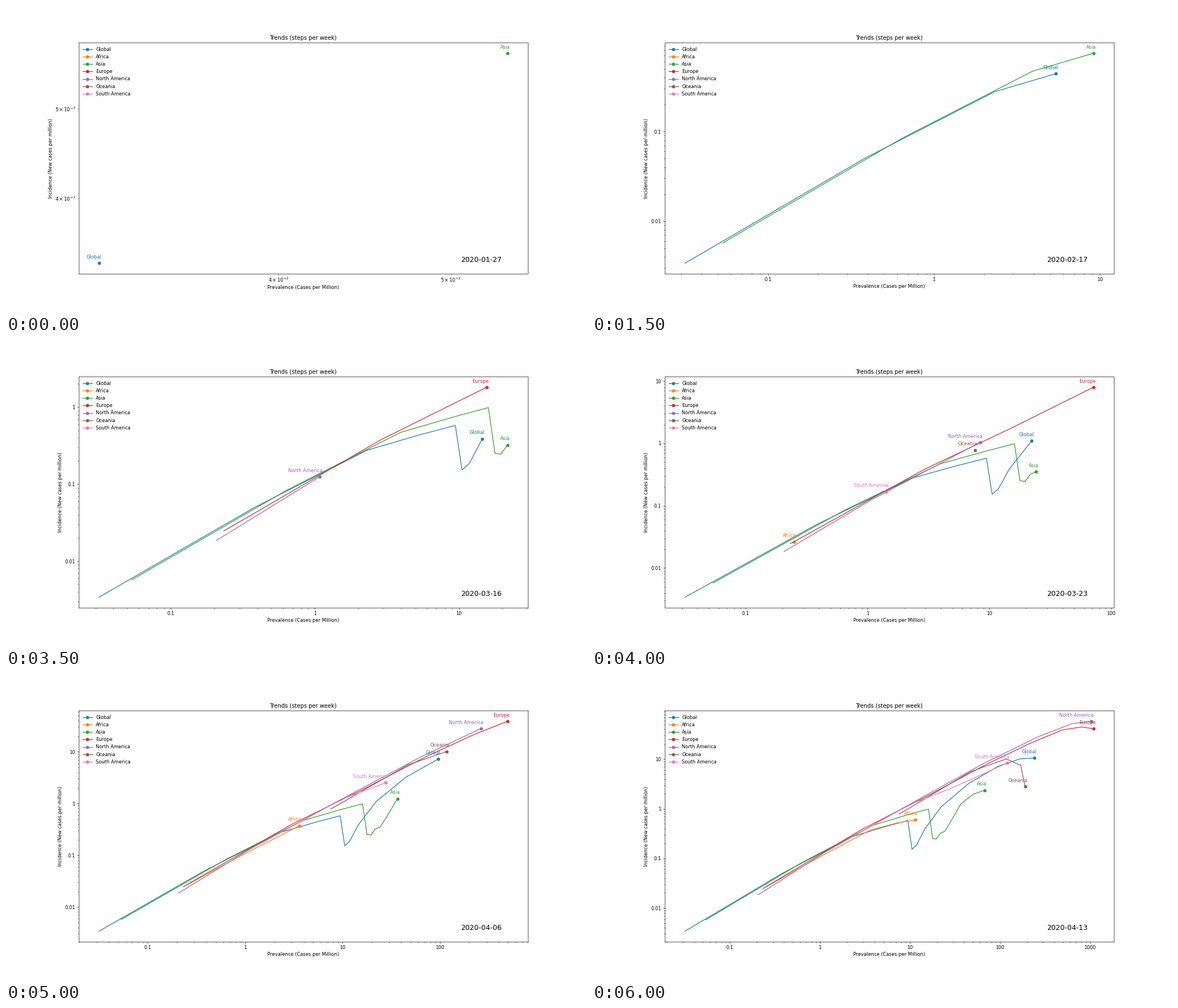
Animation of 1028x544 px, one loop 10 s. Source, as a matplotlib script:

```python
import numpy as np
import matplotlib.pyplot as plt
from matplotlib.animation import FuncAnimation
from matplotlib.ticker import FuncFormatter

DPI = 60
LAST_WEEK = 12
FRAMES = 20          # the final week is held until the loop restarts
FIRST_DAY = np.datetime64("2020-01-27")

# region: (first week, prevalence in that week, daily new cases for each week)
REGIONS = {
    "Global": (0, 0.0317, [0.0034, 0.0498, 0.2775, 0.44, 0.58, 0.153, 0.186,
                           0.388, 1.103, 3.27, 7.2, 10.15, 10.55]),
    "Africa": (8, 0.25, [0.0265, 0.109, 0.372, 0.522, 0.598]),
    "Asia": (0, 0.0538, [0.00575, 0.0835, 0.47, 0.745, 0.988, 0.2527, 0.2452,
                         0.3237, 0.35, 0.528, 1.245, 1.98, 2.36]),
    "Europe": (5, 0.2335, [0.0247, 0.38, 1.818, 8.0, 21.3, 39.0, 44.6, 41.0]),
    "North America": (6, 0.2067, [0.0185, 0.1255, 1.04, 8.24, 28.2, 52.0, 58.3]),
    "Oceania": (8, 7.614, [0.786, 5.58, 10.13, 7.5, 2.78]),
    "South America": (8, 1.42, [0.168, 1.226, 2.52, 4.79, 8.44]),
}


class Track:
    """Trail, head marker and label of one region."""

    def __init__(self, ax, name, color, first, start, rates):
        self.first = first
        self.y = np.array(rates)
        self.x = start + 7 * np.concatenate([[0], np.cumsum(self.y[1:])])
        self.trail, = ax.plot([], [], "-", color=color)
        self.head, = ax.plot([], [], "-o", color=color, label=name)
        self.label = ax.annotate(name, (1, 1), xytext=(5, 10), color=color,
                                 textcoords="offset points", ha="right")

    def show(self, week):
        n = max(0, week - self.first + 1)
        x, y = self.x[:n], self.y[:n]
        self.trail.set_data(x, y)
        self.head.set_data(x[-1:], y[-1:])
        self.label.set_visible(n > 0)
        if n:
            self.label.xy = (x[-1], y[-1])


plt.rcParams["font.family"] = "DejaVu Sans"
fig, ax = plt.subplots(figsize=(1028 / DPI, 544 / DPI), dpi=DPI)
fig.subplots_adjust(left=0.125, right=0.9, bottom=0.125, top=0.88)

ax.set_xscale("log")
ax.set_yscale("log")
for axis in (ax.xaxis, ax.yaxis):
    axis.set_major_formatter(FuncFormatter(lambda v, _: f"{v:g}"))
ax.set_title("Trends (steps per week)")
ax.set_xlabel("Prevalence (Cases per Million)")
ax.set_ylabel("Incidence (New cases per million)")

tracks = [Track(ax, name, f"C{i}", *data)
          for i, (name, data) in enumerate(REGIONS.items())]
date = ax.text(0.85, 0.05, "", transform=ax.transAxes, fontsize=15)
ax.legend(loc="upper left", frameon=False)


def update(frame):
    week = min(frame, LAST_WEEK)
    for track in tracks:
        track.show(week)
    # the date stops one week before the data does
    date.set_text(str(FIRST_DAY + 7 * min(week, LAST_WEEK - 1)))
    ax.relim()
    ax.autoscale(True)
    ax.autoscale_view()
    return []


anim = FuncAnimation(fig, update, frames=FRAMES, interval=500,
                     repeat=True, repeat_delay=0)
plt.show()
```
